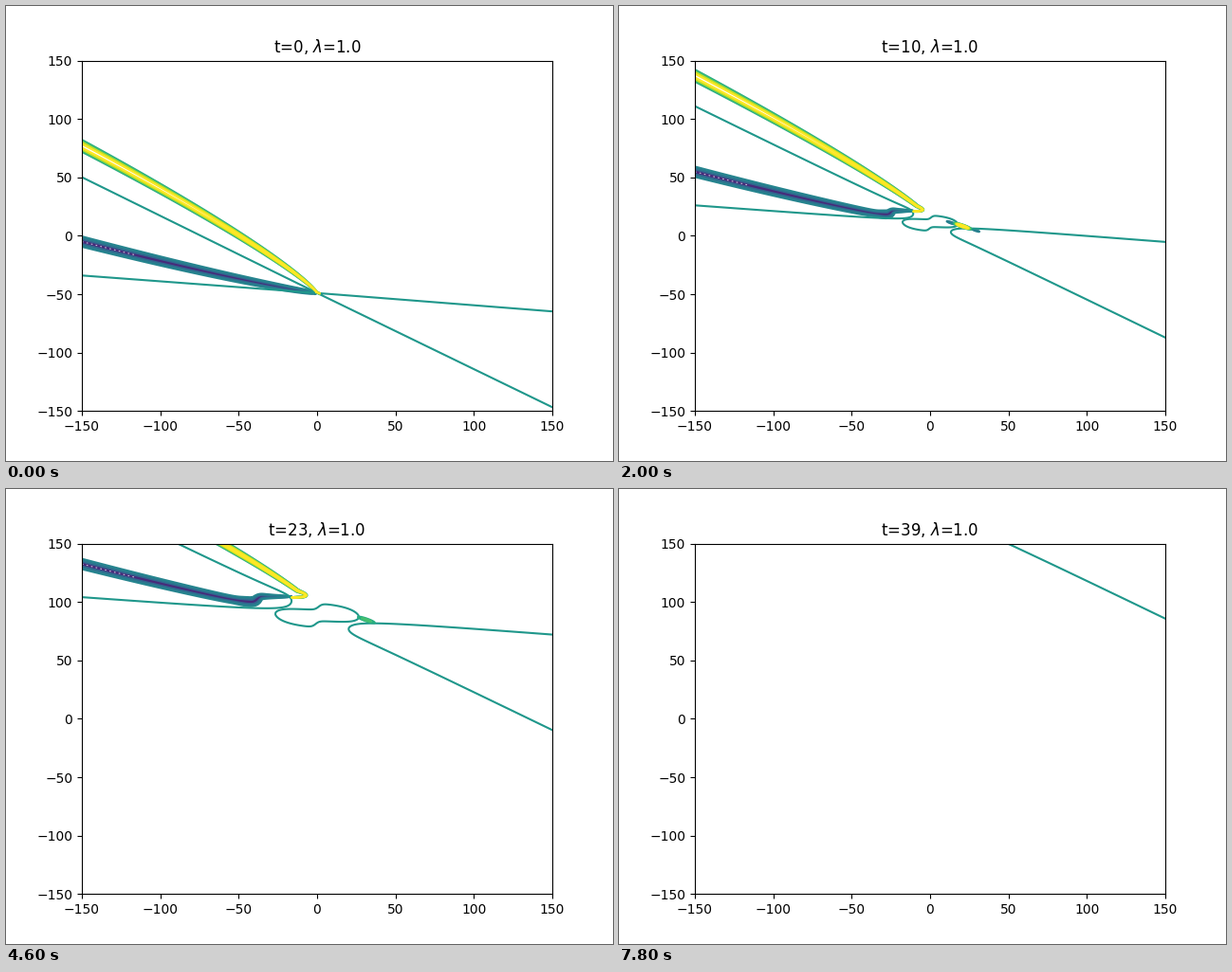
A matplotlib script for the animation above (8000 ms loop, 640 by 480 pixels).

```python
import matplotlib.pyplot as plt
import numpy as np
from matplotlib.animation import FuncAnimation
from matplotlib.collections import LineCollection

FRAMES, INTERVAL = 40, 200
EDGE = 165
CMAP = plt.get_cmap("viridis")
ZERO = 0.53

# (share of the half width or of the peak, colour)
RIDGE_LEVELS = [(1, 0.61), (0.82, 0.7), (0.6, 0.92), (0.3, 1)]
VALLEY_LEVELS = [(0.18, 0.12), (0.45, 0.32), (0.72, 0.4), (1, 0.45)]
HIGH_SPOT = [(1, 0.62), (1.4, 0.7), (1.75, 0.9), (2.2, 1)]
LOW_SPOT = [(1.6, 0.34), (1, 0.43)]

# All shapes below use x and y in units of s = sqrt(t) unless noted.


def power(x, height, exponent):
    """Curve through the origin with the given height at |x| = 150."""
    return height * (np.abs(x) / 150) ** exponent


def spaced(start, s, n=160):
    """Distances from start to the edge, dense near the start."""
    return start + (EDGE / s - start) * np.linspace(0, 1, n) ** 3


def loop():
    """Closed zero line, symmetric about the centre."""
    x = 5.55 * np.cos(np.linspace(np.pi, 0, 90))
    cap = 1 - (x / 5.55) ** 2
    top = (np.sqrt(np.maximum(0, 1 - (x / 5.55) ** 6)) - 0.05 * x
           + 0.55 * (1 + np.tanh(2 * (x - 0.2))) * cap)
    half = np.column_stack([x, top])
    return np.vstack([half, -half, half[:1]])


def hook(s, side, tip, steep, flat):
    """Zero line with two arms y = m x + k x**-p that close at the tip."""
    x = spaced(tip, s)
    a, b = (m * x + k * x ** -p for m, k, p in (steep, flat))
    gap = (a - b) / 2 * np.sqrt(1 - (tip / x) ** 6)
    mid = (a + b) / 2
    upper = np.column_stack([x, mid + gap])
    lower = np.column_stack([x, mid - gap])
    return np.vstack([upper[::-1], lower]) * [side, -side]


def ridge_path(s):
    x = -spaced(2.6, s)[::-1]
    y = power(x * s, 126, 0.85) / s + 1.4 * np.exp(x / 18)
    q = np.linspace(0, 1, 25)[1:, None]
    bend = ((1 - q) ** 2 * [x[-1], y[-1]] + 2 * q * (1 - q) * [0, 3.2]
            + q ** 2 * [-3.4, 3.2])
    return np.vstack([np.column_stack([x, y]), bend])


def valley_path(s):
    x = -spaced(3.4, s)[::-1]
    y = np.logaddexp(3 * power(x * s, 44, 1.17) / s, 3 * 2.25) / 3
    # The floor only matters near the fold, so it vanishes with s.
    return np.column_stack([x, y + 0.55 * (1 + np.tanh(2.5 * (x + 8)))])


def to_end(path):
    """Arc length left from each point to the last one."""
    step = np.hypot(*np.diff(path, axis=0).T)
    return np.append(np.cumsum(step[::-1])[::-1], 0)


def bundle(path, half, levels):
    """Nested outlines around a centre line."""
    dx, dy = np.gradient(path, axis=0).T
    norm = np.column_stack([-dy, dx]) / (np.hypot(dx, dy)[:, None] + 1e-9)
    for share, colour in levels:
        off = norm * (half * share)[:, None]
        yield np.vstack([path + off, (path - off)[::-1]]), colour


def ridge(s):
    path = ridge_path(s)
    taper = np.sqrt(np.minimum(1, to_end(path) / 4))
    half = power(path[:, 0] * s, 4.2, 0.5) / s * taper
    return bundle(path, half, RIDGE_LEVELS)


def valley(s):
    path = valley_path(s)
    left = to_end(path)
    taper = np.sqrt(np.minimum(1, left / 7))
    bulge = 1 + 0.5 * np.exp(-((left - 5.5) / 1.5) ** 2)
    half = power(path[:, 0] * s, 4.2, 0.3) / s * taper * bulge
    return bundle(path, half, VALLEY_LEVELS)


def spot(t, x, y, spread, life, levels):
    """Contours of a Gaussian spot whose height falls as 1/t."""
    a = np.linspace(0, 2 * np.pi, 50)
    for ratio, colour in levels:
        gain = life / (t * ratio)
        if gain > 1:
            r = np.sqrt(spread * np.log(gain))
            yield np.column_stack([
                x + r * np.cos(a),
                y + r * (0.24 * np.sin(a) - 0.45 * np.cos(a))]), colour


def contours(frame):
    t = max(frame, 0.03)
    s = np.sqrt(t)
    shapes = [
        *valley(s),
        *spot(t, 4.25, 0.1, 1.0, 22, LOW_SPOT),
        *spot(t, 9.2, -1.95, 1.5, 15, LOW_SPOT),
        (hook(s, -1, 3.4, (0.661, 2.8, 0.55), (0.1, 3.9, 1)), ZERO),
        (hook(s, 1, 4.2, (0.652, 2.6, 1), (0.105, 4.5, 1)), ZERO),
        (loop(), ZERO),
        *spot(t, 6.55, -0.8, 2.6, 37.5, HIGH_SPOT),
        *ridge(s),
    ]
    return [(path * s, colour) for path, colour in shapes]


fig, ax = plt.subplots(figsize=(6.4, 4.8), dpi=100)
ax.set(xlim=(-150, 150), ylim=(-150, 150))
ax.set_xticks(range(-150, 151, 50))
ax.set_yticks(range(-150, 151, 50))
lines = LineCollection([], linewidths=1.5, zorder=2)
ax.add_collection(lines, autolim=False)
core_x = np.linspace(-150, -115, 20)
core, = ax.plot([], [], color="white", lw=0.8, alpha=0.7,
                dashes=(1.5, 3), zorder=2.1)


def draw(frame):
    shift = np.array([0, 5.98 * frame - 49])
    paths, colours = zip(*contours(frame))
    lines.set_segments([p + shift for p in paths])
    lines.set_color(CMAP(np.array(colours, float)))
    core.set_data(core_x, power(core_x, 44, 1.17) + shift[1])
    ax.set_title(rf"t={frame}, $\lambda$=1.0")
    return lines, core


anim = FuncAnimation(fig, draw, frames=FRAMES, interval=INTERVAL,
                     repeat=True, repeat_delay=0, blit=False)
plt.show()
```
